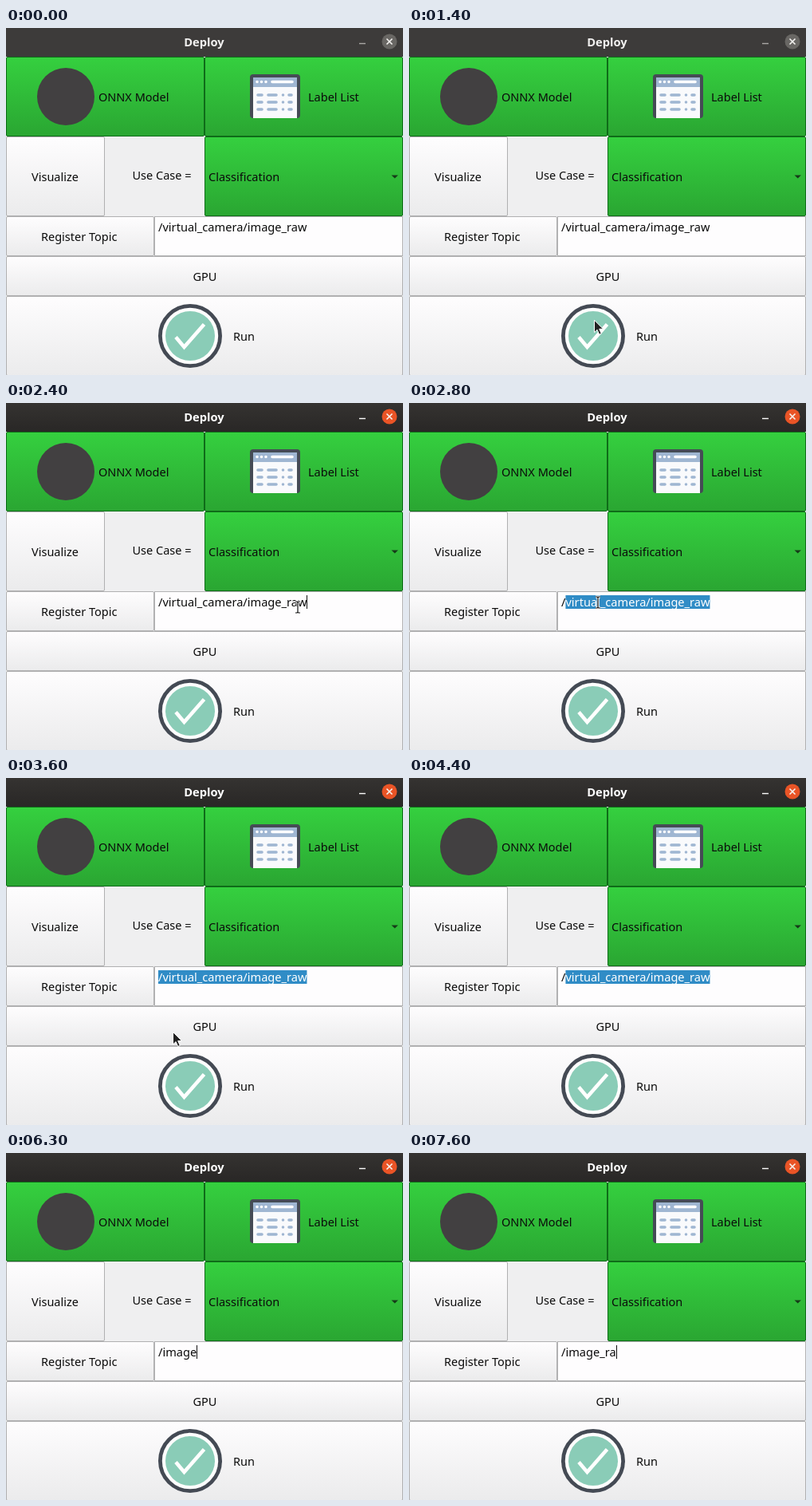
Animation, 498 px wide and 435 px high, one loop 8 s. Source, as an HTML page:

```html
<!DOCTYPE html>
<html lang="en">
<head>
<meta charset="utf-8">
<title>Deploy</title>
<style>
  html, body { margin: 0; width: 100%; height: 100%; overflow: hidden; background: #efeff0; }
  svg { display: block; width: 498px; height: 435px; }
  text { font: 14.5px "Noto Sans", sans-serif; fill: #0b0b0b; white-space: pre; }
  #title { font-weight: 700; font-size: 14.7px; text-anchor: middle; }
  #topic { font-size: 14.6px; }
</style>
</head>
<body>
<svg viewBox="0 0 498 435" width="498" height="435">
  <defs>
    <linearGradient id="green" x2="0" y2="1"><stop stop-color="#35d03f"/><stop offset="1" stop-color="#2aa632"/></linearGradient>
    <linearGradient id="grey" x2="0" y2="1"><stop stop-color="#fefdfe"/><stop offset="1" stop-color="#ebebec"/></linearGradient>
    <linearGradient id="dark" x2="0" y2="1"><stop stop-color="#353331"/><stop offset="1" stop-color="#292726"/></linearGradient>
  </defs>
  <rect width="498" height="435" fill="#efeff0"/>

  <!-- title bar -->
  <rect id="bar" width="498" height="36"/>
  <text id="title" x="248.5" y="23">Deploy</text>
  <path id="min" d="M443 19.5h8" stroke-width="1.4"/>
  <circle id="close" cx="481" cy="17" r="9.5"/>
  <path d="M477.5 13.5l7 7m0-7l-7 7" stroke="#f6f4f2" stroke-width="1.6"/>

  <g id="buttons"></g>
  <g id="labels"></g>
  <path d="M483.5 184.5h8.4l-4.2 4z" fill="#163a19"/>

  <circle cx="75" cy="86" r="36" fill="#424041"/>

  <!-- label list icon -->
  <rect x="306" y="58" width="63" height="55" rx="4" fill="#454b55"/>
  <rect x="310" y="62" width="55" height="51" fill="#f9fafc"/>
  <rect x="310" y="62" width="55" height="12" fill="#9fb6d2"/>
  <path d="M315 67.5h0M320.5 67.5h0M326 67.5h0M334 67.5h25" stroke="#fff" stroke-width="3.6" stroke-linecap="round"/>
  <path id="rows" stroke="#9fb6d2" stroke-width="3.6" stroke-linecap="round" fill="none"/>

  <!-- run icon -->
  <circle cx="231" cy="386" r="37.6" fill="#fdfdfd" stroke="#444a54" stroke-width="4.8"/>
  <circle cx="231" cy="386" r="31" fill="#8accb7"/>
  <path d="M213 387.5l10.5 12.5 25-28.5" fill="none" stroke="#fff" stroke-width="4.6"/>

  <!-- topic field -->
  <rect x="186.5" y="236.5" width="311" height="49" fill="#fefdfe" stroke="#b3b3b4"/>
  <rect id="sel" y="241" height="17" fill="#308cc6"/>
  <text id="topic" x="191" y="255"><tspan id="plain"></tspan><tspan id="picked" fill="#fff"></tspan></text>
  <rect id="caret" y="241" width="1" height="17" fill="#111"/>

  <g id="beam" fill="none">
    <path d="M-3 -7h2.2l.8 .8 .8 -.8h2.2M0 -6v12M-3 7h2.2l.8 -.8 .8 .8h2.2" stroke="#fff" stroke-width="3"/>
    <path d="M-3 -7h2.2l.8 .8 .8 -.8h2.2M0 -6v12M-3 7h2.2l.8 -.8 .8 .8h2.2" stroke="#111" stroke-width="1.2"/>
  </g>
  <path id="arrow" d="M.5 .5V16l3.6-3.4 2.6 6 2.6-1.2-2.6-5.8h4.9z" fill="#222" stroke="#fff" stroke-width="1"/>
</svg>
<script>
const $ = id => document.getElementById(id);
const set = (id, attrs) => { for (const k in attrs) $(id).setAttribute(k, attrs[k]); };
const show = (id, on) => set(id, { visibility: on ? 'visible' : 'hidden' });

const button = (x, y, w, h, kind) =>
  `<rect x="${x + .5}" y="${y + .5}" width="${w - 1}" height="${h - 1}" rx="1.5"
    fill="url(#${kind})" stroke="${kind === 'green' ? '#0f6c19' : '#b0b0b1'}"/>`;
$('buttons').innerHTML = [
  [0, 36, 249, 100, 'green'], [249, 36, 249, 100, 'green'],
  [0, 136, 124, 100, 'grey'], [249, 136, 249, 100, 'green'],
  [0, 236, 186, 50, 'grey'], [0, 286, 498, 50, 'grey'], [0, 336, 498, 100, 'grey']
].map(b => button(...b)).join('');

$('labels').innerHTML = [
  ['ONNX Model', 116, 92], ['Label List', 379, 92], ['Visualize', 32, 192],
  ['Use Case =', 158.5, 190], ['Classification', 254, 192],
  ['Register Topic', 44, 267], ['GPU', 234.5, 317], ['Run', 285, 392]
].map(([s, x, y]) => `<text x="${x}" y="${y}">${s}</text>`).join('');

$('rows').setAttribute('d', [84, 93, 102].map(y => `M316 ${y}h5M329 ${y}h10M347.5 ${y}h0M355 ${y}h3`).join(''));

const LOOP = 8000, TICK = 100, FOCUS = 2200;
const TOPIC = '/virtual_camera/image_raw';
const NONE = -1;

// time, x, y
const path = [
  [1200, 196, 407], [1500, 250, 345], [1800, 350, 267], [2000, 378.5, 253],
  [2400, 366, 256], [2800, 237, 250], [2900, 237, 250], [3000, 192, 250],
  [3100, 192, 250], [3200, 190, 250], [3400, 190, 250], [3500, 203, 278],
  [3600, 209, 318], [3700, 205, 406]
];

// time, text, first selected character, caret index
const edits = [
  [0, TOPIC, NONE, NONE], [FOCUS, TOPIC, NONE, 25],
  [2500, TOPIC, 22, NONE], [2600, TOPIC, 16, NONE], [2700, TOPIC, 8, NONE],
  [2800, TOPIC, 1, NONE], [3000, TOPIC, 0, NONE], [3200, TOPIC, NONE, 0],
  [3500, TOPIC, 0, NONE], [4400, TOPIC, 1, NONE], [5000, '/', NONE, NONE]
];
const typed = '/image_ra';
[5600, 5800, 5900, 6200, 6300, 7100, 7400, 7600].forEach((t, i) =>
  edits.push([t, typed.slice(0, i + 2), NONE, i + 2]));
edits.push([6800, '/image', NONE, NONE]);
edits.sort((a, b) => a[0] - b[0]);

function pointerAt(t) {
  if (t < path[0][0] || t > path[path.length - 1][0]) return null;
  const i = Math.max(1, path.findIndex(p => p[0] >= t));
  const [t0, x0, y0] = path[i - 1], [t1, x1, y1] = path[i];
  const k = (t - t0) / (t1 - t0);
  return [x0 + (x1 - x0) * k, y0 + (y1 - y0) * k];
}

function drawField(t) {
  const [, text, from, caret] = edits.filter(e => e[0] <= t).pop();
  const cut = from === NONE ? text.length : from;
  $('plain').textContent = text.slice(0, cut);
  $('picked').textContent = text.slice(cut);
  const xAt = n => 191 + (n > 0 ? $('topic').getSubStringLength(0, n) : 0);
  show('sel', from !== NONE);
  if (from !== NONE) set('sel', { x: xAt(from), width: xAt(text.length) - xAt(from) });
  show('caret', caret !== NONE);
  if (caret !== NONE) set('caret', { x: Math.round(xAt(caret)) });
}

function draw(time) {
  const t = Math.floor(time % LOOP / TICK) * TICK;
  const active = t >= FOCUS;
  set('bar', { fill: active ? 'url(#dark)' : '#3d3b3a' });
  $('title').style.fill = active ? '#fff' : '#f1f0ef';
  set('min', { stroke: active ? '#fff' : '#aaa8a6' });
  set('close', { fill: active ? '#e95426' : '#696764' });
  drawField(t);

  const p = pointerAt(t);
  const inField = p && p[1] < 286 && p[0] > 186;
  show('beam', inField);
  show('arrow', p && !inField);
  if (p) set(inField ? 'beam' : 'arrow', { transform: `translate(${p[0].toFixed(1)} ${p[1].toFixed(1)})` });
}

const start = performance.now();
function frame() {
  draw(performance.now() - start);
  requestAnimationFrame(frame);
}
frame();
</script>
</body>
</html>
```
